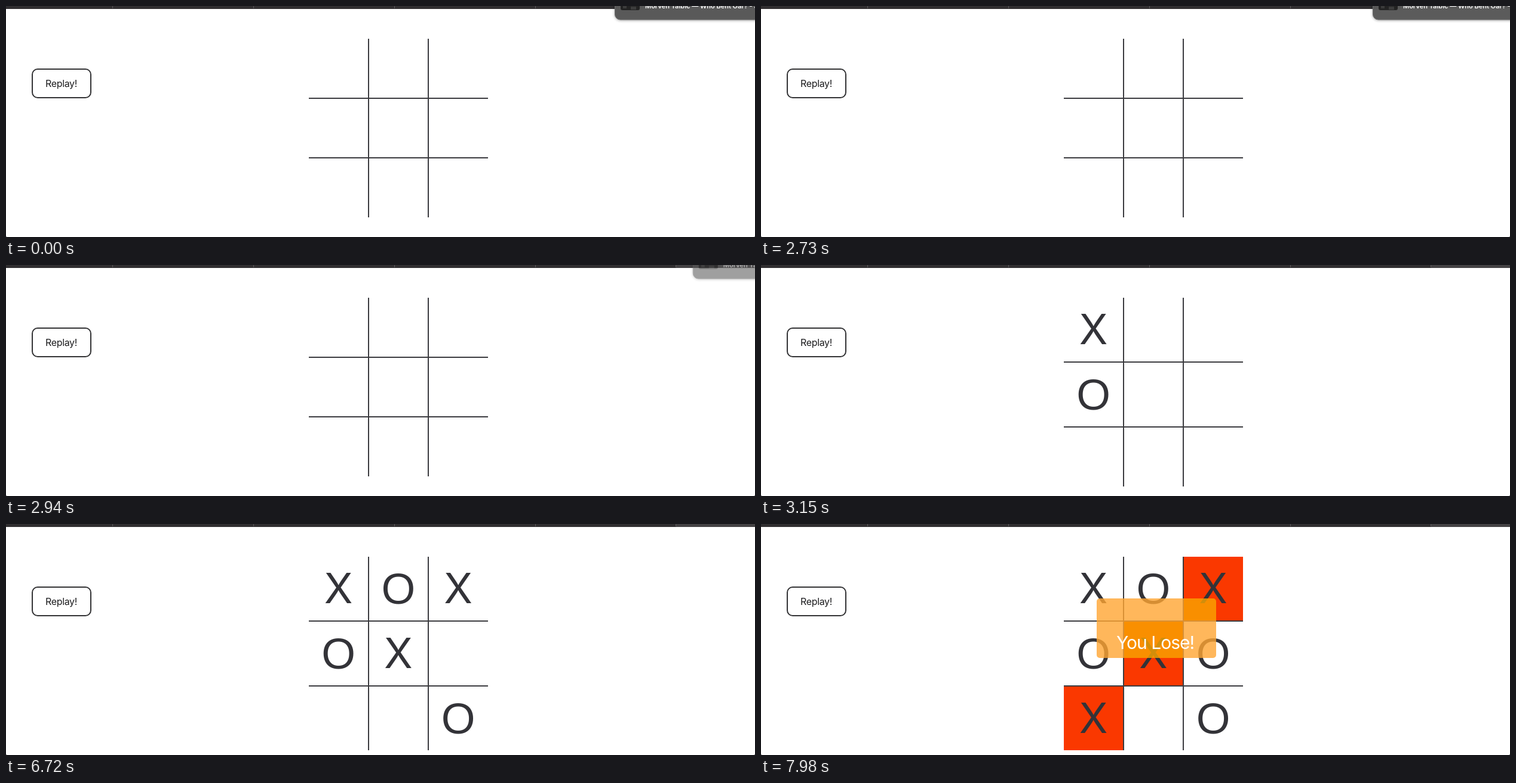
An HTML page that plays this animation: 1254x388 px, repeating every 8 s.

```html
<!DOCTYPE html>
<html lang="en">
<head>
<meta charset="utf-8">
<title>Tic-tac-toe</title>
<style>
  html, body { margin: 0; width: 100%; height: 100%; overflow: hidden; background: #fff; }
  svg { display: block; width: 100%; height: 100%; }
  text { font-family: Inter, "Liberation Sans", sans-serif; }
  .mark { fill: #333338; text-anchor: middle; }
  .X { font-size: 70px; }
  .O { font: 73px "Liberation Sans", Arial, sans-serif; }
  .label { font-size: 16px; letter-spacing: -.35px; fill: #1c1c1e; }
  .result { font-size: 30px; letter-spacing: -1px; fill: #fff; }
  .track { font-size: 11px; font-weight: 600; fill: #fff; }
  #toast { filter: drop-shadow(0 1px 2px rgba(0, 0, 0, .35)); }
</style>
</head>
<body>
<svg viewBox="0 0 1254 388">
  <rect width="1254" height="5" fill="#312f31"/>
  <rect x="1122" width="132" height="5" fill="#444244"/>
  <path d="M178.5 0v4M414.5 0v4M650.5 0v4M886.5 0v4M1121.5 0v4" stroke="#5c5a5c"/>
  <path d="M0 386q0 2 2 2H0zM1254 386q0 2-2 2h2z" fill="#555"/>

  <rect x="44" y="106" width="98" height="48" rx="9" fill="#fff" stroke="#333335" stroke-width="2"/>
  <text class="label" x="66" y="136">Replay!</text>

  <g id="wins" fill="#fa3800">
    <rect x="707" y="55" width="100" height="108"/>
    <rect x="607" y="163" width="100" height="109"/>
    <rect x="507" y="272" width="100" height="108"/>
  </g>
  <path id="grid" fill="none" stroke="#3b3b3f" stroke-width="2"/>
  <g id="marks"></g>

  <g id="popup">
    <path id="glass" fill="rgb(255,165,50)" fill-opacity=".8" fill-rule="evenodd"/>
    <path id="amber" fill="rgb(249,166,0)" fill-opacity=".8"/>
    <text class="result" x="595" y="210">You Lose!</text>
  </g>

  <g id="toast">
    <rect x="1019.5" y="-40" width="300" height="63" rx="9" fill="#595959" stroke="#6c6c6c"/>
    <rect x="1029" y="-25" width="32" height="32" rx="3" fill="#222"/>
    <path d="M1033 0h6v4h-6zM1046 1h9v5h-9z" fill="#3c3c3c"/>
    <text class="track" x="1070" y="4">Morven Talbic — Who Bent Oar? - Single</text>
  </g>
</svg>
<script>
const LOOP = 8000, STEP = 70;
const MOVES = [
  // time, symbol, column, row
  [3150, 'X', 0, 0], [3150, 'O', 0, 1],
  [4620, 'O', 1, 0], [4620, 'X', 1, 1],
  [6720, 'X', 2, 0], [6720, 'O', 2, 2],
  [7700, 'X', 0, 2], [7700, 'O', 2, 1],
];
const $ = id => document.getElementById(id);
const show = (el, on) => el.setAttribute('visibility', on ? 'visible' : 'hidden');

const marks = MOVES.map(([time, symbol, col, row]) => {
  const el = document.createElementNS('http://www.w3.org/2000/svg', 'text');
  el.setAttribute('class', 'mark ' + symbol);
  el.setAttribute('x', 556.7 + col * 100.2);
  el.setAttribute('y', (symbol === 'X' ? 133.2 : 134) + row * 109);
  el.textContent = symbol;
  $('marks').append(el);
  return { el, time };
});

// The popup tints winning cells more strongly than the white ones.
const tinted = 'M608 164H706V225H608ZM708 125H757a5 5 0 0 1 5 5V162H708Z';
$('amber').setAttribute('d', tinted);
$('glass').setAttribute('d',
  'M567 125H757a5 5 0 0 1 5 5V220a5 5 0 0 1-5 5H567a5 5 0 0 1-5-5V130a5 5 0 0 1 5-5Z' + tinted);

function drawGrid(t) {
  const [y1, y2, bottom] = t < 3150 ? [155, 255, 355] : [163, 272, t < 6720 ? 372 : 380];
  $('grid').setAttribute('d', `M607 55V${bottom}M707 55V${bottom}M507 ${y1}H807M507 ${y2}H807`);
}

function drawToast(t) {
  const shift = t < 2730 ? 0 : .00192 * (t - 2679) ** 2;
  show($('toast'), shift < 310);
  $('toast').setAttribute('transform', `translate(${shift} 0)`);
  $('toast').setAttribute('opacity', Math.max(0, 1 - shift / 310));
}

function draw(ms) {
  const t = Math.floor(ms % LOOP / STEP) * STEP;
  drawGrid(t);
  drawToast(t);
  for (const { el, time } of marks) show(el, t >= time);
  show($('wins'), t >= 7700);
  show($('popup'), t >= 7700);
}

const start = performance.now();
function tick() {
  draw(performance.now() - start);
  requestAnimationFrame(tick);
}
tick();
</script>
</body>
</html>
```
